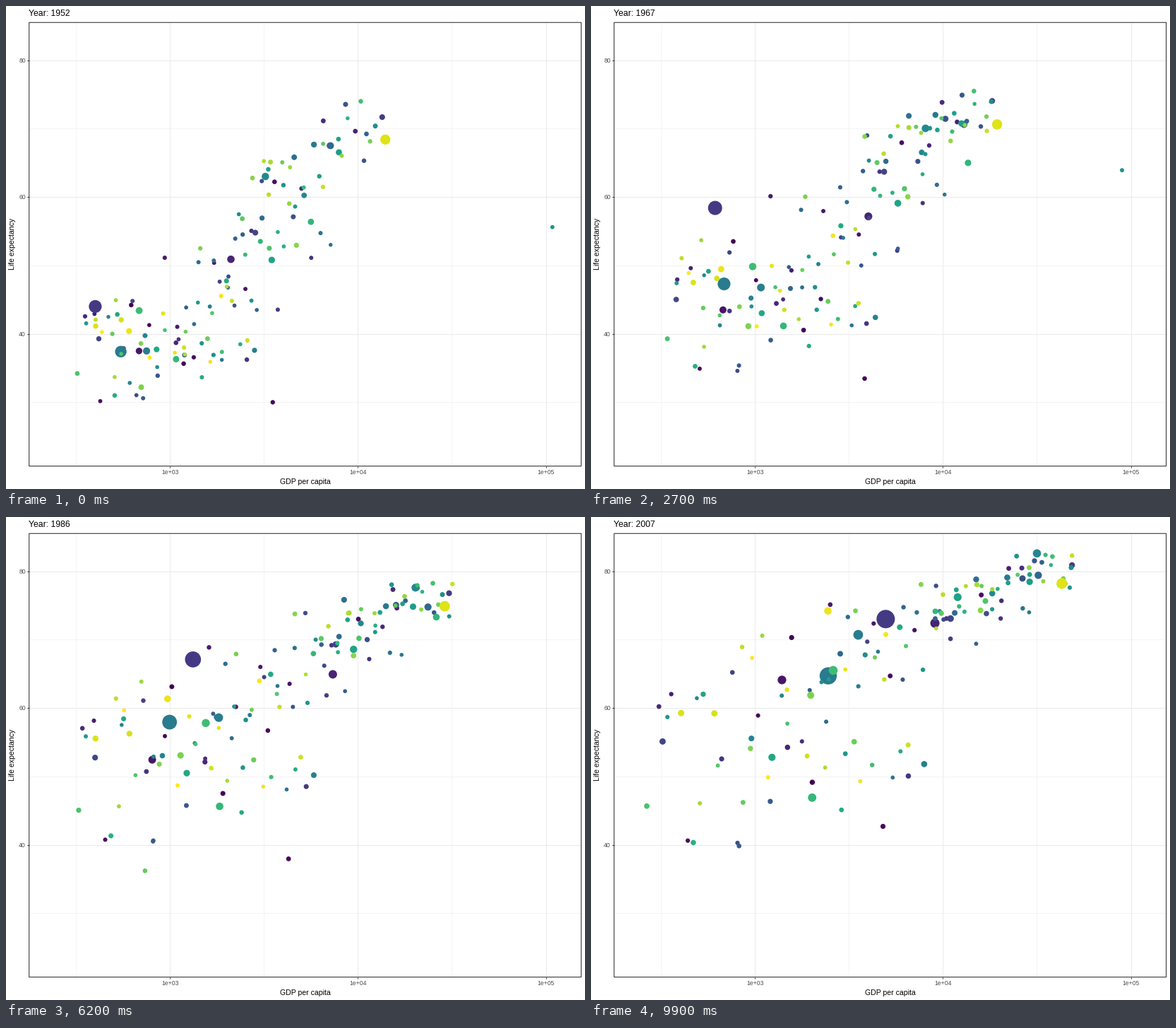
Recreate the animation shown at these times as a matplotlib script. Size 820x683 px, loop 10 s.

```python
import numpy as np
import matplotlib.pyplot as plt
from matplotlib.animation import FuncAnimation
from matplotlib.patches import Rectangle

W, H, DPI = 820, 683, 64
PT = 72 / DPI
FRAMES = 100
START, END = 1952, 2007
TOTAL = 142
LEFT, TOP, RIGHT, BOTTOM = 32.7, 23.3, 814.6, 650.6

plt.rcParams["font.family"] = "Liberation Sans"
rng = np.random.default_rng(7)

# Alphabetical rank, final population in millions, then (GDP, life) pairs
# spread evenly over the years.
COUNTRIES = {
    "China": [25, 1319, 400, 44, 576, 50.5, 488, 44.5, 613, 58.4, 677, 63.1,
              741, 64, 962, 65.5, 1379, 67.3, 1656, 68.7, 2289, 70.4,
              3119, 72, 4959, 73],
    "India": [59, 1110, 547, 37.4, 719, 49.5, 1040, 59.1, 2452, 64.7],
    "United States": [135, 301, 13990, 68.4, 20900, 71.1, 30300, 75.4,
                      42952, 78.2],
    "Kuwait": [72, 2.5, 108382, 55.6, 92000, 61.3, 86000, 68.5, 29500, 73,
               39000, 76, 47307, 77.6],
    "Japan": [67, 127, 3217, 63, 17400, 75.9, 31656, 82.6],
    "Indonesia": [60, 224, 750, 37.5, 1450, 54.5, 3541, 70.7],
    "Brazil": [15, 190, 2109, 50.9, 6850, 62.4, 9066, 72.4],
    "Germany": [48, 82, 7144, 67.5, 21250, 73.2, 32170, 79.4],
    "Pakistan": [98, 169, 685, 43.4, 1300, 55.2, 2606, 65.5],
    "Bangladesh": [9, 150, 684, 37.5, 668, 48.5, 1391, 64.1],
    "Nigeria": [95, 135, 1077, 36.3, 1780, 45.2, 2014, 46.9],
    "Rwanda": [108, 9, 493, 40, 510, 43.6, 775, 45.6, 700, 27, 863, 46.2],
    "Mexico": [83, 109, 3478, 50.8, 8760, 66, 11978, 76.2],
    "Vietnam": [138, 85, 605, 40.4, 710, 57, 2442, 74.2],
    "Angola": [4, 12, 3521, 30, 4797, 42.7],
}

# Count, correlation, then (log GDP, spread, life, spread) over the years.
REGIONS = {
    "Africa": (49, 0.45, [(2.99, 0.27, 39.2, 5), (3.12, 0.34, 46, 6),
                          (3.14, 0.38, 53.5, 7.2), (3.17, 0.43, 55, 8.8)]),
    "Americas": (22, 0.65, [(3.47, 0.22, 52.5, 9), (3.65, 0.25, 61.5, 7.5),
                            (3.75, 0.28, 68.5, 5), (3.95, 0.3, 73.8, 3.6)]),
    "Asia": (25, 0.75, [(3.2, 0.35, 47, 8.5), (3.45, 0.5, 57.5, 8.5),
                        (3.6, 0.53, 66.5, 7.2), (3.8, 0.53, 72, 6)]),
    "Europe": (29, 0.8, [(3.72, 0.23, 64.5, 5.5), (3.98, 0.2, 70.6, 3),
                         (4.15, 0.21, 74, 2.6), (4.32, 0.22, 77.5, 2.6)]),
    "Oceania": (2, 0.5, [(4.01, 0.01, 69.3, 0.1), (4.12, 0.02, 71.5, 0.2),
                         (4.25, 0.03, 75.5, 0.5), (4.46, 0.06, 80.7, 0.4)]),
}


def to_x(log_gdp):
    return 232.3 + 266.1 * (log_gdp - 3)


def to_y(life):
    return 76.6 + 9.675 * (80 - life)


def resample(years, values):
    return np.interp(years, np.linspace(START, END, len(values)), values)


def build_dots():
    """Return (rank, population, log GDP path, life path) for every country."""
    dots = []
    for rank, pop, *path in COUNTRIES.values():
        dots.append((rank, pop, np.log10(path[::2]), np.array(path[1::2])))
    used = {dot[0] for dot in dots}
    ranks = iter(rng.permutation([r for r in range(1, TOTAL + 1) if r not in used]))
    years = np.arange(START, END + 1, 5)
    for count, corr, knots in REGIONS.values():
        gdp, gdp_sd, life, life_sd = (resample(years, k) for k in zip(*knots))
        wealth = rng.permutation(np.linspace(-1.7, 1.7, count))
        other = rng.permutation(np.linspace(-1.7, 1.7, count))
        health = np.clip(corr * wealth + np.sqrt(1 - corr**2) * other, -1.7, 1.7)
        for u, v in zip(wealth, health):
            pop = min(8 * np.exp(rng.normal(0, 1.15)), 75)
            log_gdp = gdp + u * gdp_sd + rng.normal(0, 0.018, len(years))
            dots.append((next(ranks), pop, log_gdp,
                         life + v * life_sd + rng.normal(0, 0.25, len(years))))
    return sorted(dots, key=lambda dot: dot[0])


dots = build_dots()
ranks = np.array([d[0] for d in dots])
pops = np.array([d[1] for d in dots])
growth = 1 + np.clip(72 - np.array([d[3][0] for d in dots]), 3, 36) / 18

# 64 dpi divides both sides exactly in binary.
fig = plt.figure(figsize=(W / DPI, H / DPI), dpi=DPI, facecolor="white")
ax = fig.add_axes([0, 0, 1, 1])
ax.set(xlim=(0, W), ylim=(H, 0))
ax.axis("off")


def line(xs, ys, color, width, z):
    ax.plot(xs, ys, color=color, lw=width * PT, zorder=z,
            solid_capstyle="butt")


def label(x, y, text, size, color="black", **kw):
    return ax.text(x, y, text, fontsize=size * PT, color=color, **kw)


for log_gdp in (2.5, 3.5, 4.5):
    line([to_x(log_gdp)] * 2, [TOP, BOTTOM], "#ebebeb", 0.55, 1)
for life in (30, 50, 70):
    line([LEFT, RIGHT], [to_y(life)] * 2, "#ebebeb", 0.55, 1)
for power in (3, 4, 5):
    x = to_x(power)
    line([x, x], [TOP, BOTTOM], "#ebebeb", 1.07, 1)
    line([x, x], [BOTTOM, BOTTOM + 2.8], "#333333", 1.07, 3)
    label(x, 662.3, f"1e+0{power}", 8.6, "#4d4d4d", ha="center")
for life in (40, 60, 80):
    y = to_y(life)
    line([LEFT, RIGHT], [y, y], "#ebebeb", 1.07, 1)
    line([LEFT - 2.8, LEFT], [y, y], "#333333", 1.07, 3)
    label(27.8, y + 3.1, str(life), 8.6, "#4d4d4d", ha="right")

ax.add_patch(Rectangle((LEFT, TOP), RIGHT - LEFT, BOTTOM - TOP, fill=False,
                       ec="#333333", lw=1.07 * PT, zorder=4, snap=False))
label(423.7, 675.5, "GDP per capita", 10.5, ha="center")
label(12.5, 336.5, "Life expectancy", 10.5, rotation=90, ha="center",
      va="baseline", rotation_mode="anchor")
title = label(32.3, 14.2, "", 12.2)
cloud = ax.scatter(np.zeros(TOTAL), np.zeros(TOTAL), c=(ranks - 1) / (TOTAL - 1),
                   cmap="viridis", vmin=0, vmax=1, linewidths=0, zorder=2)


def update(i):
    year = START + (END - START) * i / (FRAMES - 1)
    xs = [to_x(resample(year, d[2])) for d in dots]
    ys = [to_y(resample(year, d[3])) for d in dots]
    pop = pops * growth ** ((year - END) / (END - START))
    radius = 2.6 + 10.4 * np.sqrt(pop / pops.max())
    cloud.set_offsets(np.column_stack([xs, ys]))
    cloud.set_sizes((2 * radius * PT) ** 2)
    title.set_text(f"Year: {round(year)}")
    return cloud, title


anim = FuncAnimation(fig, update, frames=FRAMES, interval=100,
                     repeat=True, repeat_delay=0)
plt.show()
```
